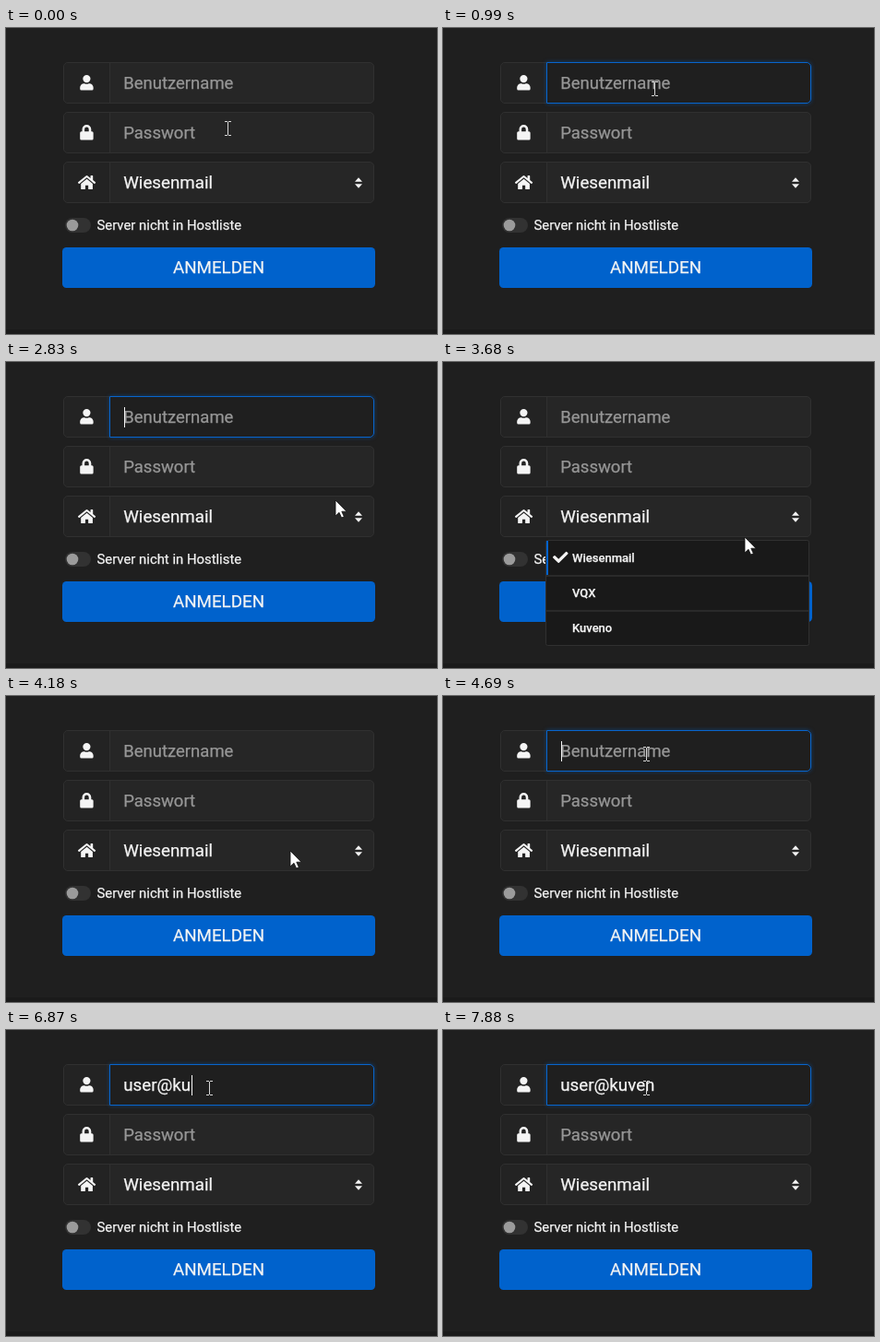
An HTML page with a canvas that plays this animation: 467x332 px, repeating every 8 s.

```html
<!DOCTYPE html>
<html lang="de">
<head>
<meta charset="utf-8">
<title>Anmeldung</title>
<style>
html, body { margin: 0; width: 100%; height: 100%; overflow: hidden; background: #1f1f1f; }
canvas { display: block; }
</style>
</head>
<body>
<canvas id="stage" width="467" height="332"></canvas>
<script>
const ctx = document.getElementById('stage').getContext('2d');
const LOOP = 8000, STEP = 167.66;
const BLUE = '#0062cc', LIGHT = '#f4f4f4', MUTED = '#979797', LINE = '#303030';
const HOSTS = ['Wiesenmail', 'VQX', 'Kuveno'];
const TYPED = 'user@kuven';
const TEXT_X = 127.2, RADIUS = 4.5;

// Steps at which the form changes
const FOCUS = 3, BLUR = 20, OPEN = 21, CLOSE = 25, REFOCUS = 27, TYPE = 33, TYPED_ALL = 44;

// Pointer path: step, x, y
const PATH = [
  [0, 240, 109], [1, 237, 98], [2, 231, 73], [3, 229, 66], [8, 229, 66],
  [11, 290, 76], [14, 370, 120], [17, 350, 165], [20, 330, 176],
  [22, 327, 190], [24, 312, 172], [25, 308, 168], [27, 220, 63], [48, 220, 63]
];

const USER = new Path2D('M224 0a128 128 0 1 1 0 256a128 128 0 1 1 0-256z' +
  'M135 288h16q73 32 146 0h17a134 134 0 0 1 134 134v42a48 48 0 0 1-48 48H48a48 48 0 0 1-48-48v-42a134 134 0 0 1 135-134z');
const LOCK = new Path2D('M48 224h24v-72a152 152 0 0 1 304 0v72h24a48 48 0 0 1 48 48v192a48 48 0 0 1-48 48H48a48 48 0 0 1-48-48V272a48 48 0 0 1 48-48z' +
  'M152 224h144v-72a72 72 0 0 0-144 0z');
const HOME = new Path2D('M288 144L96 302V464q0 16 16 16h112q16 0 16-16V352h96v112q0 16 16 16h112q16 0 16-16V302z' +
  'M572 251L488 182V44q0-12-12-12h-56q-12 0-12 12v73L318 43q-30-22-61 0L4 251q-8 8-1 17l25 31q8 9 17 2L288 101L531 301q9 7 17-2l25-31q7-9-1-17z');
const CHECK = new Path2D('M174 439L7 273q-14-18 0-36l36-36q18-14 36 0L192 314L432 73q18-14 36 0l36 36q14 18 0 36L210 439q-18 14-36 0z');
const ARROW = new Path2D('M0 0V17L4 13.3L6.6 19L9.3 17.8L6.8 12.2H12z');

function box(x, y, w, h, r, fill, stroke) {
  ctx.beginPath();
  ctx.roundRect(x, y, w, h, r);
  if (fill) { ctx.fillStyle = fill; ctx.fill(); }
  if (stroke) { ctx.strokeStyle = stroke; ctx.lineWidth = 1; ctx.stroke(); }
}

function rect(x, y, w, h, color) {
  ctx.fillStyle = color;
  ctx.fillRect(x, y, w, h);
}

// A hairline outline gives the text its slightly heavier look
function label(text, x, y, size, color, weight = 400, align = 'left') {
  ctx.font = `${weight} ${size}px Roboto, sans-serif`;
  ctx.textAlign = align;
  ctx.fillStyle = ctx.strokeStyle = color;
  ctx.lineWidth = .25;
  ctx.fillText(text, x, y);
  ctx.strokeText(text, x, y);
}

function icon(path, x, y, scale) {
  ctx.save();
  ctx.translate(x, y);
  ctx.scale(scale, scale);
  ctx.fillStyle = LIGHT;
  ctx.fill(path, 'evenodd');
  ctx.restore();
}

function field(y) {
  box(62.5, y + .5, 336, 44, RADIUS, '#262626', LINE);
  box(63, y + 1, 49, 43, [RADIUS, 0, 0, RADIUS], '#232323');
  rect(112, y + 1, 1, 43, LINE);
}

function focusRing(y) {
  const corners = [0, RADIUS, RADIUS, 0];
  ctx.save();
  ctx.shadowColor = 'rgba(0, 98, 204, .5)';
  ctx.shadowBlur = 4;
  box(112, y, 287, 45, corners, '#1f1f1f');
  ctx.restore();
  box(112.5, y + .5, 286, 44, corners, '#1f1f1f', '#0865cd');
}

function triangle(y, dy) {
  ctx.beginPath();
  ctx.moveTo(378, y);
  ctx.lineTo(386, y);
  ctx.lineTo(382, y + dy);
  ctx.fillStyle = LIGHT;
  ctx.fill();
}

function userField(k) {
  const focused = k >= FOCUS && k < BLUR || k >= REFOCUS;
  const count = k < TYPE ? 0 : Math.min(TYPED.length, Math.max(1, 1 + Math.floor((k - 34) * .9)));
  const text = TYPED.slice(0, count);
  field(37);
  icon(USER, 80.2, 51, .0322);
  if (focused) focusRing(37);
  if (text) label(text, TEXT_X, 66, 18.75, LIGHT);
  else label('Benutzername', TEXT_X, 66, 18.5, MUTED);
  if (!focused) return;
  const start = k >= TYPED_ALL ? TYPED_ALL : k >= REFOCUS ? REFOCUS : FOCUS;
  const typing = k >= TYPE && k < TYPED_ALL;
  const on = typing || Math.floor((k - start) / 3) % 2 === 0;
  const width = text ? ctx.measureText(text).width : 0;
  if (on) rect(Math.round(TEXT_X + width + .5), 49, 1, 22, LIGHT);
}

function form(k) {
  rect(0, 0, 467, 332, '#1f1f1f');
  rect(0, 327, 467, 5, '#1a1a1a');
  userField(k);

  field(91);
  icon(LOCK, 80.2, 105, .0322);
  label('Passwort', TEXT_X, 120, 18.5, MUTED);

  field(145);
  icon(HOME, 78, 159, .0332);
  label(HOSTS[0], TEXT_X, 174, 18.75, LIGHT);
  triangle(166.7, -4.5);
  triangle(169.3, 4.5);

  box(64, 206, 28, 16, 8, '#323232');
  box(65.7, 207.7, 12.6, 12.6, 6.3, '#9b9b9b');
  label('Server nicht in Hostliste', 98.5, 219, 14.87, LIGHT);

  box(61, 238, 339, 44, RADIUS, BLUE);
  label('ANMELDEN', 230.5, 266, 18.75, LIGHT, 400, 'center');
}

function dropdown(k) {
  if (k < OPEN || k >= CLOSE) return;
  ctx.save();
  if (k === OPEN) {
    ctx.globalAlpha = .6;
    ctx.translate(0, -6);
  }
  box(111.5, 193.5, 285, 114, 2, '#191919', LINE);
  rect(112, 194, 2, 38, BLUE);
  HOSTS.forEach((host, i) => {
    const y = 194 + 38 * i;
    if (i) rect(112, y - 1, 284, 2, '#2a2a2a');
    label(host, 140, y + 23, 13, LIGHT, 500);
  });
  icon(CHECK, 119, 203.6, .0325);
  ctx.restore();
}

function pointer(k) {
  const i = PATH.findIndex(p => p[0] > k);
  const [k0, x0, y0] = PATH[i - 1], [k1, x1, y1] = PATH[i];
  const f = (k - k0) / (k1 - k0);
  const x = Math.round(x0 + (x1 - x0) * f), y = Math.round(y0 + (y1 - y0) * f);
  const overInput = y < 82 || y > 90 && y < 136;
  if (overInput) {
    const color = '#d8d8d8';
    for (const dy of [-8, 7]) {
      rect(x - 3, y + dy, 3, 1, color);
      rect(x + 1, y + dy, 3, 1, color);
    }
    rect(x, y - 7, 1, 14, color);
    return;
  }
  ctx.save();
  ctx.translate(x, y);
  ctx.fillStyle = '#fff';
  ctx.fill(ARROW);
  ctx.strokeStyle = '#111';
  ctx.lineWidth = .8;
  ctx.stroke(ARROW);
  ctx.restore();
}

function draw(now) {
  const k = Math.min(47, Math.floor((now % LOOP + 16) / STEP));
  form(k);
  dropdown(k);
  pointer(k);
  requestAnimationFrame(draw);
}
requestAnimationFrame(draw);
</script>
</body>
</html>
```
